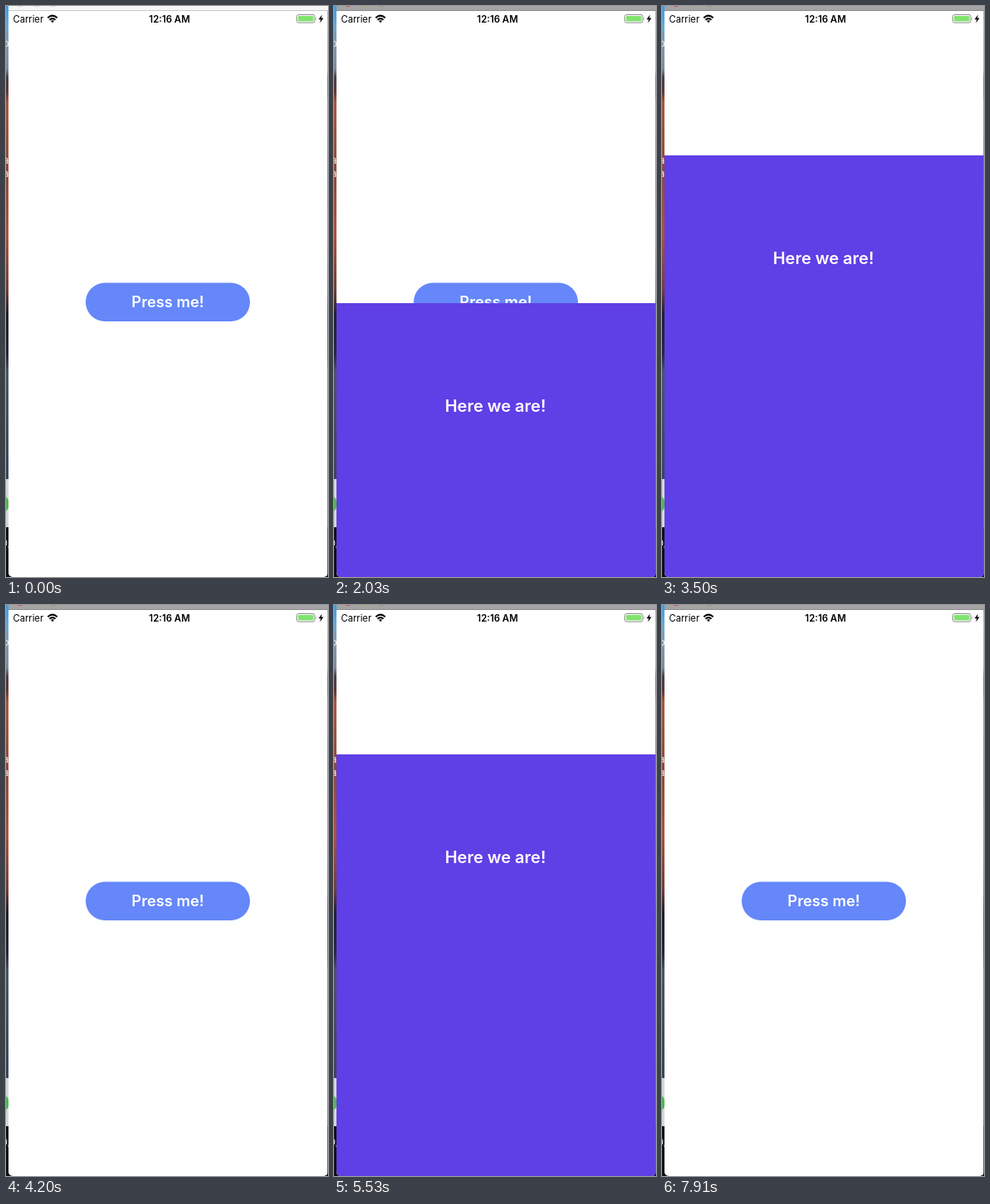
An HTML page for the animation above (7.98 s loop, 388 px wide and 688 px high).

```html
<!DOCTYPE html>
<html lang="en">
<head>
<meta charset="utf-8">
<title>Sliding sheet</title>
<style>
  html, body { margin: 0; width: 100%; height: 100%; overflow: hidden; background: #fff; }
  svg { display: block; width: 388px; height: 688px; font-family: Inter, Roboto, sans-serif; }
</style>
</head>
<body>
<svg viewBox="0 0 388 688">
  <defs>
    <linearGradient id="desktop" x1="0" y1="0" x2="0" y2="1">
      <stop offset="0" stop-color="#3d9de0"/>
      <stop offset=".035" stop-color="#69a9d2"/>
      <stop offset=".06" stop-color="#8399ad"/>
      <stop offset=".11" stop-color="#7d8c9d"/>
      <stop offset=".125" stop-color="#49404a"/>
      <stop offset=".15" stop-color="#5d3a36"/>
      <stop offset=".17" stop-color="#a5583f"/>
      <stop offset=".29" stop-color="#8c4a3a"/>
      <stop offset=".4" stop-color="#a8543e"/>
      <stop offset=".5" stop-color="#703d35"/>
      <stop offset=".54" stop-color="#20202b"/>
      <stop offset=".61" stop-color="#242938"/>
      <stop offset=".64" stop-color="#4a5564"/>
      <stop offset=".82" stop-color="#3b4657"/>
    </linearGradient>
    <clipPath id="window"><rect x="3" y="-20" width="385" height="708" rx="5"/></clipPath>
  </defs>

  <!-- Desktop behind the window -->
  <rect width="388" height="688" fill="url(#desktop)"/>
  <rect y="570" width="4" height="58" fill="#d5d7d9"/>
  <circle cx="-7" cy="600" r="11" fill="#55b456"/>
  <rect y="628" width="388" height="60" fill="#101013"/>
  <g fill="#fff" font-size="11">
    <text x="-3" y="49">o</text>
    <text x="-3" y="190">a</text>
    <text x="-3" y="206">a</text>
    <text x="-5" y="651">0,</text>
  </g>

  <g clip-path="url(#window)">
    <rect x="3" width="384.4" height="688" fill="#fff"/>
    <rect id="titleBar" x="3" width="385" height="6"/>
    <rect id="titleLine" x="3" y="5" width="385" height="1"/>
    <g id="lights">
      <circle cx="17" cy="-5" r="6"/>
      <circle cx="37" cy="-5" r="6"/>
      <circle cx="57" cy="-5" r="6"/>
    </g>

    <rect x="96" y="333.5" width="198" height="46.5" rx="23.25" fill="#6587f9"/>
    <text x="195" y="363" text-anchor="middle" font-size="18.3" font-weight="600" fill="#fff">Press me!</text>

    <g id="sheet">
      <rect x="3" width="384.6" height="700" fill="#5f3fe6"/>
      <text x="194.5" y="131" text-anchor="middle" font-size="20" font-weight="600" fill="#fff">Here we are!</text>
    </g>

    <!-- Status bar -->
    <text x="8.5" y="20" font-size="11.2">Carrier</text>
    <g fill="none" stroke="#000" stroke-width="2">
      <path d="M50.3 14.2Q56 9 61.7 14.2M52.5 16.7Q56 13.5 59.5 16.7"/>
    </g>
    <path d="M54 18.1Q56 16.4 58 18.1L56 20.2Z"/>
    <text x="197" y="20" text-anchor="middle" font-size="11.4" font-weight="600">12:16 AM</text>
    <rect x="350.5" y="10.5" width="21.5" height="9.6" rx="2" fill="#fff" stroke="#8c8c8c"/>
    <rect x="352" y="12" width="18.5" height="6.6" rx=".8" fill="#7fe36e"/>
    <path d="M373 13.6q1.8 1.7 0 3.4z" fill="#8c8c8c"/>
    <path d="M380.8 10.5L376.6 16.2H379.2L378.2 20.6L382.6 14.6H379.9Z"/>
  </g>
</svg>
<script>
  const LOOP = 7980, STEP = 70;
  const HIDDEN = 688, OPEN = 180;
  const OPEN_TIME = 600, CLOSE_TIME = 240;
  const visits = [{ open: 1672, close: 3610 }, { open: 4707, close: 6483 }];

  const byId = id => document.getElementById(id);
  const sheet = byId('sheet'), titleBar = byId('titleBar'), titleLine = byId('titleLine');
  const lights = [...byId('lights').children];

  const ease = x => (1 - Math.cos(Math.PI * Math.min(1, Math.max(0, x)))) / 2;

  function sheetTop(t) {
    const shown = visits.reduce((sum, v) =>
      sum + ease((t - v.open) / OPEN_TIME) - ease((t - v.close) / CLOSE_TIME), 0);
    return HIDDEN + (OPEN - HIDDEN) * shown;
  }

  function draw(t) {
    sheet.setAttribute('transform', `translate(0 ${sheetTop(t).toFixed(2)})`);
    const active = t >= STEP;
    titleBar.setAttribute('fill', active ? '#a5a3a4' : '#f6f6f6');
    titleLine.setAttribute('fill', active ? '#8e8c8d' : '#c9c9c9');
    const colors = active ? ['#d94b55', '#c1a253', '#72a663'] : ['#d2d2d2', '#d2d2d2', '#d2d2d2'];
    lights.forEach((light, i) => light.setAttribute('fill', colors[i]));
  }

  const start = performance.now();
  function tick() {
    const t = (performance.now() - start) % LOOP;
    draw(Math.floor(t / STEP) * STEP);
    requestAnimationFrame(tick);
  }
  draw(0);
  requestAnimationFrame(tick);
</script>
</body>
</html>
```
